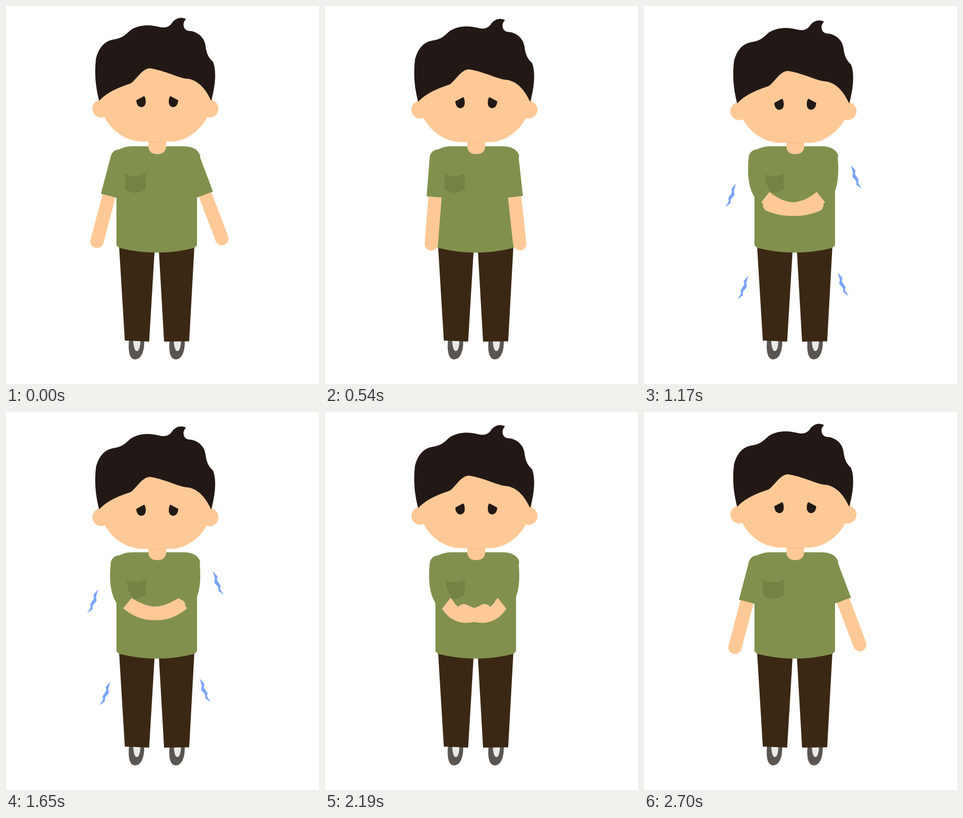
These frames come from a looping animation (598 by 722 pixels, 3750 ms). An HTML page:

```html
<!DOCTYPE html>
<html lang="en">
<head>
<meta charset="utf-8">
<title>Shivering man</title>
<style>
  html, body { margin: 0; width: 100%; height: 100%; overflow: hidden; background: #fff; }
  svg { display: block; width: 100%; height: 100%; }
  .skin { fill: #ffc997; }
  .dark { fill: #221916; }
  .shirt { fill: #81914d; }
  .pants { fill: #3b2814; }
  .arm { fill: none; stroke: #ffc997; stroke-width: 25.5; stroke-linecap: round; }
  .sleeve { fill: none; stroke: #81914d; stroke-width: 32; }
</style>
</head>
<body>
<svg viewBox="0 0 598 722">
  <defs>
    <g id="shoe">
      <path fill="#5a5551" d="M235 638H264C265 660 258 675 247 675S233 660 235 638Z"/>
      <path fill="#e9eae8" d="M243 638H257Q256 659 250 659T243 638Z"/>
    </g>
    <path id="eye" class="dark" d="M249 180L264 172Q267 175 267 183C267 197 249 197 249 180Z"/>
    <path id="bolt" fill="#7ba5f8" d="M176 339L167 349L168 356L161 367L162 373L155 384L165 377L166 369L173 361L172 353Z"/>
  </defs>

  <g id="bolts">
    <use href="#bolt"/>
    <use href="#bolt" transform="translate(23.5 176)"/>
    <use href="#bolt" transform="translate(571 -35) scale(-1 1)"/>
    <use href="#bolt" transform="translate(546 170) scale(-1 1)"/>
  </g>

  <use href="#shoe"/>
  <use href="#shoe" x="77.5"/>
  <path class="pants" d="M216 458L284 466L273.500 641L227 639ZM292 466L360 458L350 640.500L302 641Z"/>

  <path class="shirt" d="M240 268H340Q364 268 371 285L365 330V457L360 462Q289 480 216 462L211 457V300L213 276Q225 268 240 268Z"/>
  <path fill="#748343" d="M227 320Q247 330 267 320V349Q247 365 227 349Z"/>

  <path class="skin" id="face" d="M178 170C179 225 221 259 262 259H315C350 259 392 225 395 175L350 130L275 112L235 130Z"/>
  <path class="skin" d="M272 259H306V270Q304 283 289 283T272 270Z"/>
  <path id="seam" stroke="#edbb8b" d="M273 260.500H305"/>
  <g id="head">
    <circle class="skin" cx="182" cy="196" r="17"/>
    <circle class="skin" cx="389" cy="196" r="17"/>
    <path class="dark" d="M178 181C170 150 169 125 172 100C176 85 184 68 205 64C222 62 228 55 238 46C255 34 280 36 293 40
      C300 42 310 42 316 34C322 24 334 19 344 25C339 30 337 36 342 44C345 47 350 48 355 48C370 52 379 62 381 75
      C383 92 388 100 395 106C402 120 401 150 392 181C383 162 370 143 348 139C335 140 300 122 275 119
      C258 119 245 148 235 149Q195 162 178 181Z"/>
    <use href="#eye"/>
    <use href="#eye" transform="translate(578 0) scale(-1 1)"/>
  </g>

  <g id="right" transform="translate(570 0) scale(-1 1)">
    <path class="arm"/><path class="sleeve"/><circle class="shirt" cx="216" cy="290" r="16"/>
  </g>
  <g id="left">
    <path class="arm"/><path class="sleeve"/><circle class="shirt" cx="216" cy="290" r="16"/>
  </g>
</svg>
<script>
const LOOP = 3750, STEP = 30, SHOULDER = [216, 290];
const el = id => document.getElementById(id);
const ramp = (t, a, b) => Math.min(1, Math.max(0, (t - a) / (b - a)));
const mix = (p, q, k) => p.map((v, i) => v + (q[i] - v) * k);

// Point on the straight arm, at a distance from the shoulder
const along = (angle, dist) => [
  SHOULDER[0] - dist * Math.sin(angle),
  SHOULDER[1] + dist * Math.cos(angle)
];

// bend goes from hanging to crossed; reach slides the hand over the other arm; bob lifts it
function drawArm(id, angle, bend, reach, bob) {
  const elbow = mix(along(angle, 75), [232, 365], bend);
  const curve = mix(along(angle, 120), [255 + 20 * reach, 406 - 4 * reach], bend);
  const hand = mix(along(angle, 165), [305 + 25 * reach, 375 + 5 * bob], bend);
  hand[1] += 20 * Math.sin(Math.PI * bend);
  const upper = mix(SHOULDER, elbow, .5);
  upper[0] -= 14 * bend;
  upper[1] += 20 * bend;
  const [arm, sleeve] = el(id).children;
  arm.setAttribute('d', `M${elbow}Q${curve} ${hand}`);
  sleeve.setAttribute('d', `M${SHOULDER}Q${upper} ${elbow}`);
}

function frame(now) {
  const t = Math.floor(now % LOOP / STEP) * STEP;
  const fold = 1500 - Math.abs(t - 1500); // arms unfold the way they fold
  const angle = (14.8 - 10.3 * ramp(fold, 300, 540)) * Math.PI / 180;
  const bend = ramp(fold, 540, 810);
  const reach = ramp(t, 690, 1020) - ramp(t, 1650, 2190);
  const bob = Math.cos(2 * Math.PI * (t - 1170) / 960);
  drawArm('left', angle, bend, reach, bob);
  drawArm('right', angle * 1.4, bend, reach, bob);

  const drop = 5 * (ramp(t, 300, 870) - ramp(t, 1920, 2460));
  const shift = (id, k) => el(id).setAttribute('transform', `translate(0 ${drop * k})`);
  shift('head', 1);
  shift('face', .5);
  shift('seam', .2);
  el('bolts').setAttribute('opacity', ramp(t, 540, 840) - ramp(t, 1920, 2190));
}

const start = performance.now();
function tick() {
  frame(performance.now() - start);
  requestAnimationFrame(tick);
}
tick();
</script>
</body>
</html>
```
